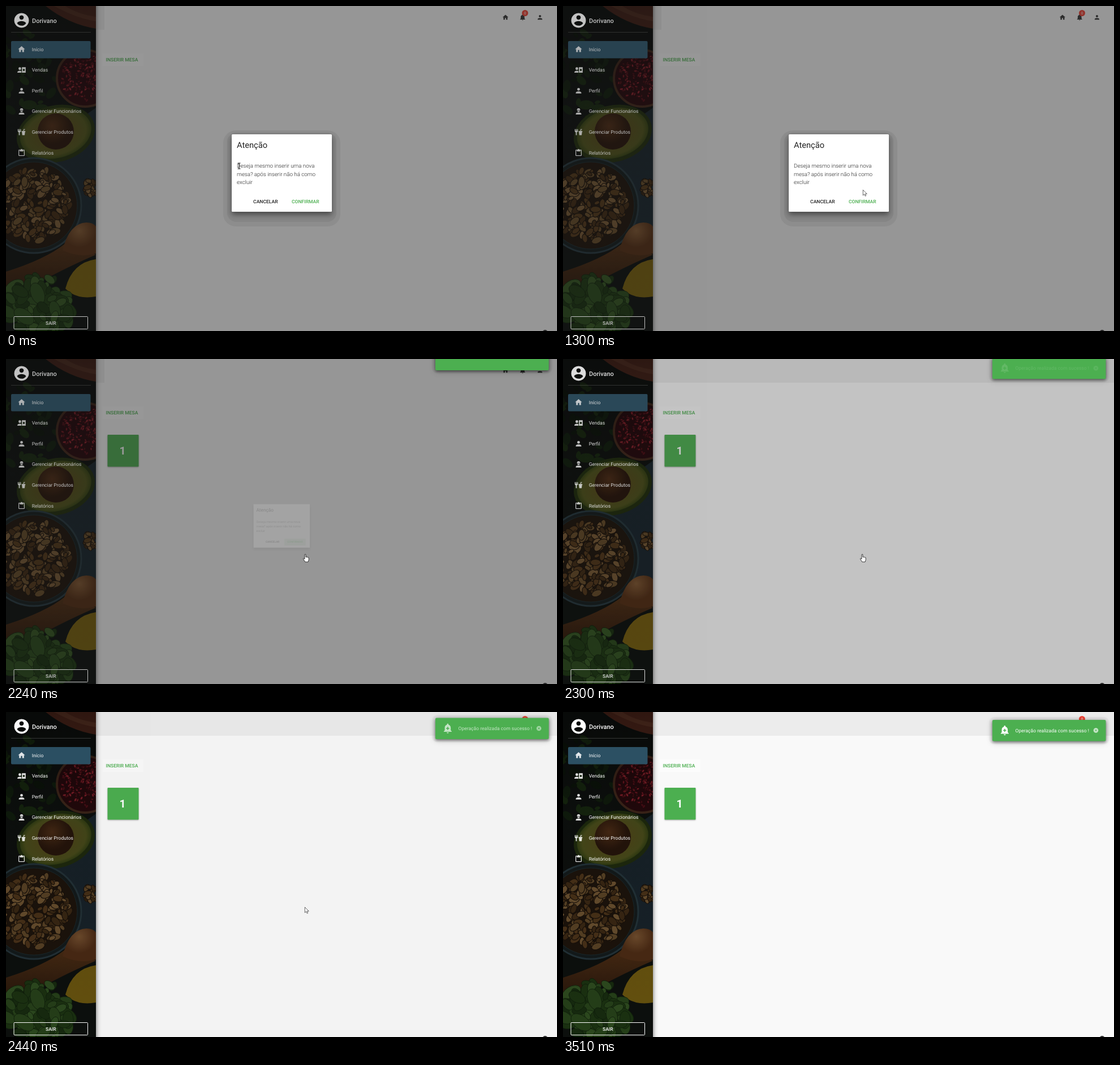
Write an HTML page that moves like this. It is 974 px wide and 575 px high and loops after 4.56 s.

```html
<!DOCTYPE html>
<html lang="pt-BR">
<head>
<meta charset="utf-8">
<title>Mesas</title>
<style>
  html, body { margin: 0; width: 100%; height: 100%; overflow: hidden; background: #f9f9f9; }
  svg { display: block; width: 974px; height: 575px; }
  text { font: 400 8.56px Roboto, sans-serif; text-rendering: geometricPrecision; }
  .btn { font-weight: 500; }
  .green { fill: #4caf50; }
  .mid { text-anchor: middle; }
  #dialog .body { font-size: 9.78px; font-weight: 300; fill: #222; }
  #card { filter: drop-shadow(0 5px 5px rgba(0,0,0,.45)); }
  #tile { filter: drop-shadow(0 1px 1px rgba(0,0,0,.3)); }
  #toastBox { filter: drop-shadow(0 2px 2px rgba(0,0,0,.4)) drop-shadow(0 1px 5px rgba(0,0,0,.3)); }
  #nuts { stroke: #1a120b; stroke-width: 1.2; }
  #seeds { stroke: #23090c; stroke-width: .7; }
  #leaves { stroke: #10200c; stroke-width: .8; }
</style>
</head>
<body>
<svg viewBox="0 0 974 575">
  <defs>
    <path id="home" d="M10 20v-6h4v6h5v-8h3L12 3 2 12h3v8z"/>
    <path id="person" d="M12 4a4 4 0 0 1 0 8 4 4 0 0 1 0-8m0 10c4.400 0 8 1.800 8 4v2H4v-2c0-2.200 3.600-4 8-4"/>
    <path id="cash" fill-rule="evenodd" d="M11 8a4 4 0 1 1-8 0 4 4 0 1 1 8 0M0 20v-2c0-2.200 3.100-4 7-4 1.800 0 3.400.4 4.600 1v5zM13 4h11v16H13zM18.500 9a3 3 0 1 0 .01 0z"/>
    <path id="worker" d="M12 15c-4.400 0-8 1.800-8 4v2h16v-2c0-2.200-3.600-4-8-4M8 9.500a4 4 0 0 0 8 0zM7 8.500h10l-1-4-2-1.500h-4l-2 1.500z"/>
    <path id="food" d="M1 3h2v5h1.500V3h2v5H8V3h2v6c0 2-1 3-3 3.500V21H4v-8.500C2 12 1 11 1 9zM12 9h5l1-6h4v2h-2.500L19 9h4v3h-1l-1 9h-7l-1-9h-1z"/>
    <path id="clipboard" fill-rule="evenodd" d="M19 3h-4.200a3 3 0 0 0-5.600 0H5a2 2 0 0 0-2 2v14a2 2 0 0 0 2 2h14a2 2 0 0 0 2-2V5a2 2 0 0 0-2-2M5 5h2v3h10V5h2v14H5z"/>
    <path id="bell" d="M12 22a2 2 0 0 0 2-2h-4a2 2 0 0 0 2 2m6-6v-5c0-3.100-1.600-5.600-4.500-6.300V4a1.500 1.500 0 0 0-3 0v.7C7.600 5.400 6 7.900 6 11v5l-2 2v1h16v-1z"/>
    <path id="avatar" fill-rule="evenodd" d="M12 2a10 10 0 1 0 .01 0M12 5a3 3 0 1 1-.01 0M12 19.200c-2.500 0-4.700-1.300-6-3.200 0-2 4-3.100 6-3.100s6 1.100 6 3.100a7.200 7.200 0 0 1-6 3.200"/>
    <linearGradient id="edge">
      <stop stop-opacity=".28"/><stop offset=".5" stop-opacity=".06"/><stop offset="1" stop-opacity="0"/>
    </linearGradient>
    <linearGradient id="shade" x2="0" y2="1">
      <stop stop-opacity=".4"/><stop offset=".3" stop-opacity=".12"/><stop offset="1" stop-opacity=".08"/>
    </linearGradient>
    <radialGradient id="flesh">
      <stop offset=".4" stop-color="#50471a"/><stop offset=".85" stop-color="#4a4d1b"/><stop offset="1" stop-color="#333f13"/>
    </radialGradient>
    <radialGradient id="pit" cx=".4" cy=".35">
      <stop stop-color="#4a2b15"/><stop offset="1" stop-color="#26150b"/>
    </radialGradient>
    <linearGradient id="wood" x2="0" y2="1">
      <stop stop-color="#4a2c14"/><stop offset="1" stop-color="#24140a"/>
    </linearGradient>
    <radialGradient id="peach" cx=".5" cy=".25">
      <stop stop-color="#74502f"/><stop offset="1" stop-color="#4d2c15"/>
    </radialGradient>
    <clipPath id="sideClip"><path d="M0 0h159v575H0z"/></clipPath>
    <clipPath id="okClip"><rect x="496" y="336" width="67" height="21" rx="1"/></clipPath>
  </defs>

  <rect width="974" height="575" fill="#f9f9f9"/>
  <rect id="header" x="159" height="42" fill="#ececec"/>
  <rect x="171" y="84" width="72" height="22" rx="1" fill="#fff" opacity=".5"/>
  <text class="btn green mid" x="205" y="97.800">INSERIR MESA</text>
  <g fill="#333">
    <use href="#home" transform="translate(876.800 14) scale(.51)"/>
    <use href="#bell" transform="translate(906.500 13.300) scale(.56)"/>
    <use href="#person" transform="translate(937.800 14) scale(.51)"/>
    <circle cx="953" cy="578" r="5"/>
  </g>
  <circle cx="917.500" cy="12.500" r="5.500" fill="#f44336"/>
  <text class="mid" x="917.500" y="14.800" fill="#fff" style="font-size:6.500px">0</text>
  <g id="tile">
    <rect class="green" x="179.500" y="134" width="55" height="56.500" rx="1"/>
    <text class="mid" x="206" y="168.500" fill="#fff" style="font-size:19.500px;font-weight:700">1</text>
  </g>

  <rect x="159" width="10" height="575" fill="url(#edge)"/>
  <g clip-path="url(#sideClip)">
    <rect width="159" height="575" fill="#0d100e"/>
    <path d="M60 250L159 180V400H60z" fill="#18232a"/>
    <path d="M70 0h89v40Q110 32 70 0" fill="#4f261b"/>
    <path d="M85 0q40 22 74 27v-8Q125 14 105 0z" fill="#5e3425"/>
    <g id="herbs"></g>
    <circle cx="140" cy="128" r="50" fill="#24090c" stroke="#3f261a" stroke-width="4"/>
    <g id="seeds"></g>
    <g transform="rotate(-14 88 226)">
      <ellipse cx="88" cy="226" rx="70" ry="50" fill="#1f2b0e"/>
      <ellipse cx="88" cy="225" rx="64" ry="44" fill="url(#flesh)"/>
    </g>
    <circle cx="88" cy="222" r="32" fill="url(#pit)"/>
    <circle cx="49" cy="353" r="84" fill="#141b1c" stroke="#24343a" stroke-width="3"/>
    <circle cx="49" cy="353" r="77" fill="#1d140c" stroke="#1b2a2e"/>
    <g id="nuts"></g>
    <path d="M0 470Q70 448 105 420L159 440Q90 470 40 500L0 518z" fill="url(#wood)"/>
    <path d="M100 432Q112 384 142 383q12 0 17 7v48q-30 8-59-6" fill="url(#peach)"/>
    <path d="M105 500q12-46 54-52v66q-35 6-54-14" fill="#6b560f"/>
    <g id="leaves"></g>
    <rect width="159" height="575" fill="url(#shade)"/>
  </g>
  <g fill="#fff">
    <use href="#avatar" transform="translate(11.900 9.900) scale(1.300)"/>
    <text class="btn" x="46" y="29.500" style="font-size:11px">Dorivano</text>
    <path d="M9 46h141v1H9z" opacity=".18"/>
    <rect x="9" y="62" width="140.500" height="30.500" rx="2" fill="#2c5063"/>
    <g id="menu"></g>
    <rect x="14" y="549.500" width="130.500" height="22" rx="1" fill="none" stroke="#fff"/>
    <text class="btn mid" x="79.300" y="563.600">SAIR</text>
  </g>

  <g id="overlay" fill="#212121">
    <path d="M159 0h815v575H159z"/>
    <path d="M0 0h159v575H0z" opacity=".6"/>
  </g>

  <g id="dialog">
    <g id="halo" fill-opacity=".06">
      <rect x="384" y="220" width="207" height="170" rx="22"/>
      <rect x="391" y="224" width="193" height="158" rx="16"/>
    </g>
    <rect id="card" x="399" y="227" width="177" height="137" rx="1.500" fill="#fff"/>
    <text x="408" y="251.300" fill="#222" style="font-size:14.670px">Atenção</text>
    <text class="body" x="408" y="286">Deseja mesmo inserir uma nova</text>
    <text class="body" x="408" y="300.700">mesa? após inserir não há como</text>
    <text class="body" x="408" y="315.300">excluir</text>
    <circle id="ripple" class="green" cx="528" cy="346" clip-path="url(#okClip)" opacity=".25"/>
    <text class="btn mid" x="458.800" y="349" fill="#222">CANCELAR</text>
    <text class="btn green mid" x="529.300" y="349">CONFIRMAR</text>
  </g>

  <g id="toast">
    <rect x="753" y="9" width="212.500" height="48" rx="9" fill-opacity=".03"/>
    <rect id="toastBox" class="green" x="759" y="14" width="200.500" height="37.500" rx="2"/>
    <g id="toastText" fill="#fff">
      <use href="#bell" transform="translate(770.300 21.800) scale(.88)"/>
      <path d="M778 32.500h5.600M780.800 29.700v5.600" stroke="#4caf50" stroke-width="1.500"/>
      <text x="799.500" y="35.600">Operação realizada com sucesso !</text>
      <circle cx="942" cy="32.500" r="4.300" opacity=".7"/>
      <path d="M940.300 30.800l3.400 3.400m0-3.400l-3.400 3.400" stroke="#4caf50" stroke-width=".9"/>
    </g>
  </g>

  <g id="cursor" fill="#fff" stroke="#111" stroke-width=".8" stroke-linejoin="round">
    <path id="arrow" stroke-width=".65" d="M.3.3V10L2.600 7.900 4.200 11.300 5.700 10.600 4.200 7.300H7.300z"/>
    <path id="hand" d="M0 1q1.200-1.200 2 0V5.500q1-.8 1.800.2 1-.7 1.800.3 1.400-.5 1.600 1V10.500L6 14H.8L-2.600 8.700q.2-1.600 1.600-.6L0 9z"/>
    <path id="beam" fill="none" stroke-width="1.100" d="M-2.500-5H2.500M0-5V5M-2.500 5H2.500"/>
  </g>
</svg>
<script>
const LOOP = 4560;
const $ = id => document.getElementById(id);
const show = (id, on) => $(id).style.display = on ? '' : 'none';
const clamp = v => Math.max(0, Math.min(1, v));
const span = (t, from, to) => clamp((t - from) / (to - from));
const easeOut = u => 1 - (1 - u) ** 3;

let seed = 7;
const rand = (lo, hi) => {
  seed = (seed * 16807) % 2147483647;
  return lo + (hi - lo) * seed / 2147483647;
};

// Scatter small ellipses over a disc or flattened patch.
function scatter(id, count, [cx, cy, rx, ry], [minSize, maxSize], colors) {
  let out = '';
  for (let i = 0; i < count; i++) {
    const a = rand(0, 2 * Math.PI), d = Math.sqrt(rand(0, 1)), size = rand(minSize, maxSize);
    const x = cx + rx * d * Math.cos(a), y = cy + ry * d * Math.sin(a);
    out += `<ellipse cx="${x}" cy="${y}" rx="${size}" ry="${size * .6}" fill="${colors[i % colors.length]}"
      transform="rotate(${rand(0, 180)} ${x} ${y})"/>`;
  }
  $(id).innerHTML += out;
}
const nutTones = ['#5b4426', '#3b2814', '#6b5130', '#4b3319'];
scatter('herbs', 50, [30, 130, 60, 85], [5, 14], ['#101c0d', '#0b130a', '#16260f']);
scatter('seeds', 190, [140, 127, 43, 41], [2, 3.4], ['#6a1720', '#4a0f16', '#84202a']);
scatter('nuts', 200, [48, 352, 64, 65], [4, 10], nutTones);
scatter('nuts', 20, [149, 322, 11, 14], [4, 8], nutTones);
scatter('leaves', 110, [58, 530, 58, 52], [7, 20], ['#1c3412', '#27431a', '#182d10', '#2f4d20']);

[['home', 'Início'], ['cash', 'Vendas'], ['person', 'Perfil'], ['worker', 'Gerenciar Funcionários'],
 ['food', 'Gerenciar Produtos'], ['clipboard', 'Relatórios']].forEach(([icon, label], i) => {
  const y = 76.5 + 36.65 * i;
  $('menu').innerHTML += `<use href="#${icon}" opacity=".87" transform="translate(20.2 ${y - 7.3}) scale(.61)"/>
    <text x="45.7" y="${y + 3}">${label}</text>`;
});

// Pointer route: time, x, y
const route = [
  [0, 412, 283], [30, 412, 283], [31, 416, 273], [129, 416, 273], [130, 413, 267], [670, 413, 267],
  [920, 466, 280], [1170, 525, 299], [1200, 526, 303], [1300, 530, 325], [1450, 530, 339], [1620, 528, 345],
  [2530, 528, 345], [2780, 650, 389], [2900, 730, 428], [3050, 794, 468], [3110, 797, 470],
  [3300, 862, 508], [3510, 918, 572]
];
function pointerAt(t) {
  const i = Math.max(1, route.findIndex(p => p[0] > t));
  const [t0, x0, y0] = route[i - 1], [t1, x1, y1] = route[i];
  const u = span(t, t0, t1);
  return [x0 + (x1 - x0) * u, y0 + (y1 - y0) * u];
}

// The closing transition advances in coarse steps.
const holds = [2240, 2300, 2350, 2440, 2530];
const stepped = t => t >= 2240 && t < 2530 ? holds.filter(h => h <= t).pop() : t;

function render(time) {
  const t = stepped(time);

  const closing = easeOut(span(t, 2120, 2360));
  show('dialog', t < 2300);
  show('halo', t < 2120);
  $('dialog').setAttribute('opacity', 1 - closing);
  $('dialog').setAttribute('transform', `translate(487 295) scale(${1 - closing / 2}) translate(-487 -295)`);
  $('ripple').setAttribute('r', 45 * easeOut(span(t, 1980, 2180)));

  $('overlay').setAttribute('opacity', .46 * (1 - easeOut(span(t, 2240, 2570))));
  $('header').setAttribute('width', t < 2300 ? 15 : 815);
  show('tile', t >= 2190);

  show('toast', t >= 2190);
  const rise = t < 3050 ? 31.5 * Math.exp((2240 - t) / 91) : 0;
  $('toast').setAttribute('transform', `translate(0 ${-rise})`);
  $('toastText').setAttribute('opacity', span(t, 2270, 2520));

  show('cursor', t < 3510);
  if (t < 3510) {
    const [x, y] = pointerAt(t);
    const kind = t < 130 ? 'beam' : y > 336 && t < 2440 ? 'hand' : 'arrow';
    ['beam', 'hand', 'arrow'].forEach(id => show(id, id === kind));
    $('cursor').setAttribute('transform', `translate(${x} ${y})`);
  }
}

const start = performance.now();
function tick() {
  render((performance.now() - start) % LOOP);
  requestAnimationFrame(tick);
}
tick();
</script>
</body>
</html>
```
